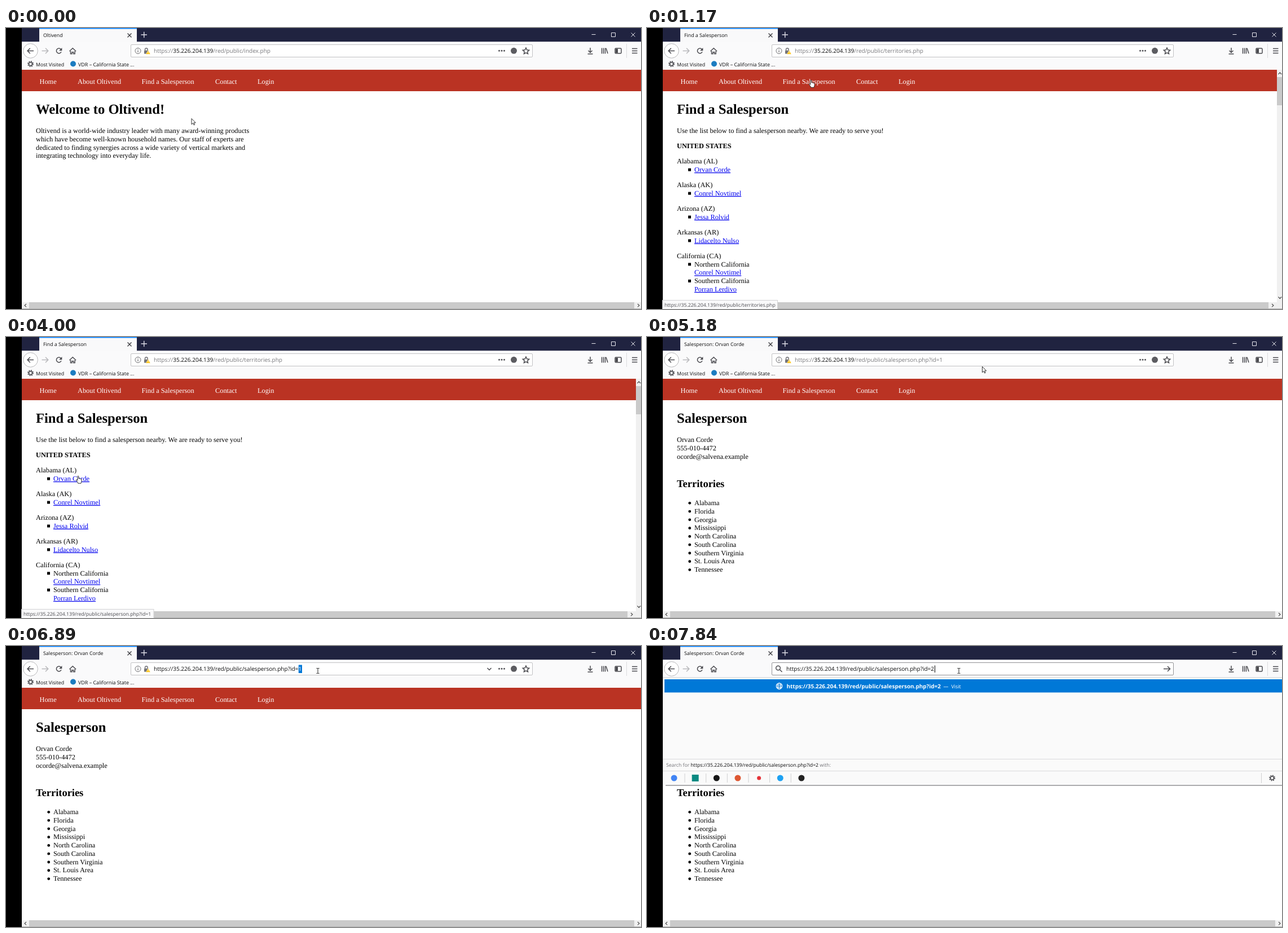
Recreate the animation shown at these times as an HTML page. Size 1126 by 498 pixels, loop 7990 ms.

```html
<!DOCTYPE html>
<html lang="en">
<head>
<meta charset="utf-8">
<title>Browser session</title>
<style>
  html, body { margin: 0; width: 100%; height: 100%; overflow: hidden; background: #fff; }
  svg { display: block; width: 100vw; height: 100vh; }
  text { text-rendering: geometricPrecision; white-space: pre; }
  .ui { font-family: "Open Sans", "Noto Sans", sans-serif; }
  .web { font-family: "Liberation Serif", "Times New Roman", serif; font-size: 12.33px; }
  .icon { fill: none; stroke: #4a4a4f; stroke-width: 1.5; }
</style>
</head>
<body>
<svg id="stage" viewBox="0 0 1126 498" xmlns="http://www.w3.org/2000/svg"></svg>
<script>
const LOOP = 7990, STEP = 120, LINE = 14.78;
const INK = '#0c0c0d', BLUE = '#0078d7';
const HOST = '35.226.204.139', DIR = '/red/public/';
const SELLER = 'Orvan Corde';

const rect = (x, y, w, h, fill, more = '') =>
  `<rect x="${x}" y="${y}" width="${w}" height="${h}" fill="${fill}" ${more}/>`;
const line = (d, color, width = 1) =>
  `<path d="${d}" fill="none" stroke="${color}" stroke-width="${width}"/>`;
const icon = (d, more = '') => `<path class="icon" d="${d}" ${more}/>`;
const dot = (x, y, r, fill) => `<circle cx="${x}" cy="${y}" r="${r}" fill="${fill}"/>`;
const ui = (x, y, s, size, fill = INK) =>
  `<text class="ui" x="${x}" y="${y}" font-size="${size}" fill="${fill}">${s}</text>`;
const web = (x, y, s, more = '') => `<text class="web" x="${x}" y="${y}" ${more}>${s}</text>`;
const head = (y, s, size) => web(53, y, s, `font-weight="700" style="font-size:${size}px"`);
const span = (s, fill, more = '') => `<tspan fill="${fill}" ${more}>${s}</tspan>`;

const gear = (x, y) => `<g class="icon" transform="translate(${x} ${y})">
  <circle r="3"/><circle r="4.5" stroke-width="2" stroke-dasharray="1.767"/></g>`;
const globe = (x, y, color) => `<g fill="none" stroke="${color}" stroke-width="1.1" transform="translate(${x} ${y})">
  <circle r="5.3"/><ellipse rx="2.4" ry="5.3"/><path d="M-5-1.7H5M-5 1.9H5"/></g>`;

// ---- pages -------------------------------------------------------------

const PAGES = {
  home: { title: 'Oltivend', file: 'index.php' },
  list: { title: 'Find a Salesperson', file: 'territories.php', tall: true },
  person: { title: 'Salesperson: ' + SELLER, file: 'salesperson.php?id=1' }
};

const NAV = [[59.5, 'Home'], [127, 'About Oltivend'], [240.5, 'Find a Salesperson'],
  [371, 'Contact'], [446, 'Login']];

const STATES = [
  ['Alabama (AL)', [[SELLER]]],
  ['Alaska (AK)', [['Conrel Novtimel']]],
  ['Arizona (AZ)', [['Jessa Rolvid']]],
  ['Arkansas (AR)', [['Lidacelto Nulso']]],
  ['California (CA)', [['Conrel Novtimel', 'Northern California'], ['Porran Lerdivo', 'Southern California']]]
];

const lines = (y, list, x = 53) => list.map((s, i) => web(x, y + i * LINE, s)).join('');

function homeBody() {
  return head(151.7, 'Welcome to Oltivend!', 24.6) + lines(186, [
    'Oltivend is a world-wide industry leader with many award-winning products',
    'which have become well-known household names. Our staff of experts are',
    'dedicated to finding synergies across a wide variety of vertical markets and',
    'integrating technology into everyday life.']);
}

function listBody() {
  let out = head(151.7, 'Find a Salesperson', 24.6) +
    web(53, 186, 'Use the list below to find a salesperson nearby. We are ready to serve you!') +
    web(53, 213, 'UNITED STATES', 'font-weight="700"');
  STATES.forEach(([state, people], i) => {
    let y = 240.2 + i * 41.9;
    out += web(53, y, state);
    for (const [name, region] of people) {
      y += LINE;
      out += rect(73, y - 6.3, 5, 5, '#000');
      if (region) { out += web(84, y, region); y += LINE; }
      out += web(84, y, name, 'fill="#0000ee" text-decoration="underline"');
    }
  });
  return out;
}

function personBody() {
  const places = ['Alabama', 'Florida', 'Georgia', 'Mississippi', 'North Carolina',
    'South Carolina', 'Southern Virginia', 'St. Louis Area', 'Tennessee'];
  return head(151.7, 'Salesperson', 24.6) +
    lines(186, [SELLER, '555-010-4472', 'ocorde@salvena.example']) +
    head(265.5, 'Territories', 18.45) + lines(298, places, 84) +
    places.map((_, i) => dot(75.7, 294.3 + i * LINE, 2.4, '#000')).join('');
}

const BODY = { home: homeBody(), list: listBody(), person: personBody() };

function pageView(name) {
  const tall = PAGES[name].tall, right = tall ? 1117 : 1126, end = tall ? 1102 : 1114;
  let out = rect(28, 74, 1098, 424, '#fff') + rect(28, 74, right - 28, 38, '#ba3323') +
    NAV.map(([x, s]) => web(x, 99, s, 'fill="#fff"')).join('') + BODY[name] +
    rect(28, 486, 1098, 12, '#f0f0f0') + rect(41, 486, end - 41, 11, '#cacaca') +
    line(`M36 489l-3 2.7l3 2.7M${end + 6} 489l3 2.7l-3 2.7`, '#505050', 1.2) +
    rect(28, 497, 1098, 1, '#b4b4b4');
  if (tall) out += rect(1117, 74, 9, 412, '#f0f0f0') + rect(1117, 87, 9, 50, '#cacaca') +
    line('M1119.5 82l2.8-3l2.8 3M1119.5 476.500l2.8 3l2.8-3', '#505050', 1.2);
  return out;
}

// ---- browser chrome ----------------------------------------------------

const CHROME = rect(0, 0, 28, 498, '#000') + rect(28, 0, 1098, 24.5, '#202340') +
  rect(59, 0, 173, 25, '#f9f9fa') + rect(59, 0, 173, 1.6, '#0a84ff') +
  rect(28, 24.5, 1098, 49.5, '#fafafb') +
  line('M215.5 9.500l7 7m0-7l-7 7', '#38383d', 1.3) +
  line('M239.500 12h10.500M244.750 6.800v10.500', '#dcdce4', 1.4) +
  line('M1038.500 11.500h7M1073.500 8.500h7v7h-7zM1108.500 8.500l7 7m0-7l-7 7', '#e8e8ee') +
  '<circle cx="43.500" cy="40.500" r="12.800" fill="#fff" stroke="#b8b8ba"/>' +
  icon('M49 40.500H38.500M42.800 35.800l-4.700 4.700l4.700 4.700', 'stroke-width="1.800"') +
  line('M63.500 40.500H74M70 35.800l4.700 4.700l-4.700 4.700', '#b9b9bc', 1.6) +
  icon('M112.500 41.200l5.800-5.400l5.800 5.400M114.500 41v4.700h2.500v-3h2.600v3h2.500V41') +
  icon('M1036 35v8M1032.500 40l3.500 3.500l3.500-3.500M1031.500 46h9') +
  icon('M1056.500 35.500v10M1059.500 35.500v10M1062.500 35.500v10M1064 35.800l3 9.500') +
  '<rect class="icon" x="1080" y="36" width="11" height="9" rx="1.500"/>' +
  rect(1081, 37, 4, 7, '#4a4a4f') + rect(1100, 28, 1, 25, '#dcdcde') +
  icon('M1110 36.500h9.500M1110 40.500h9.500M1110 44.500h9.500') +
  gear(43.5, 63.7) + ui(53, 67.6, 'Most Visited', 8.8) +
  dot(119, 63.5, 5, '#1c7cc0') + ui(128, 67.6, 'VDR – California State ...', 8.95);

const RELOAD = icon('M98 42.300A4.500 4.500 0 1 1 97.300 37.500', 'stroke-width="1.700"') +
  '<path d="M99.300 35v5.200h-5.200z" fill="#4a4a4f"/>';
const STOP = icon('M90 36.500l8 8m0-8l-8 8', 'stroke-width="1.700"');

const PAGE_ICONS =
  '<circle cx="234" cy="40.500" r="5" fill="none" stroke="#6a6a6e"/>' +
  line('M234 39.800v3.500M234 37.500v1.300', '#6a6a6e', 1.2) +
  rect(245, 39.8, 8, 6, '#737378', 'rx="1"') + line('M246.500 40v-2a2.300 2.300 0 0 1 4.600 0v2', '#737378', 1.5) +
  '<path d="M252 39.500l4 7h-8z" fill="#ffbf00" stroke="#fff" stroke-width=".5"/>' +
  line('M252 41.800v2.200M252 44.800v.900', '#fff') +
  [874.5, 879, 883.5].map(x => dot(x, 40.3, 1.5, '#55555a')).join('') +
  dot(900.5, 40.3, 5.5, '#5c5c61') +
  icon('M922 35l1.700 3.700l4 .500l-3 2.700l.800 4l-3.500-2l-3.500 2l.800-4l-3-2.700l4-.500z', 'stroke-width="1.200"');
const TYPING_ICONS = '<g class="icon"><circle cx="232.500" cy="39" r="3.800"/>' +
  '<path d="M235.500 42l4 4M916 40.500h11.500M923 36l4.500 4.500l-4.500 4.500"/></g>';

function urlBar(s) {
  const path = DIR + PAGES[s.page].file, size = 10.04;
  const box = rect(221.5, 29.5, 712, 22, '#fff', `rx="1.5" stroke="${s.typed == null ? '#c2c2c4' : '#939396'}"`);
  if (s.typed != null) {
    const url = `https://${HOST}${DIR}salesperson.php?id=${s.typed}`;
    return box + TYPING_ICONS + ui(247, 44.3, url, size) +
      rect(s.typed ? 510 : 504.2, 34.5, 1, 12.5, '#000');
  }
  let out = box + PAGE_ICONS;
  if (s.beam) out += icon('M853.500 39l3.500 3.500l3.500-3.500', 'stroke-width="1.300"');
  if (s.picked === 'all')
    return out + rect(262, 33.5, 263, 14.5, BLUE) + ui(262, 44.3, `https://${HOST}${path}`, size, '#fff');
  if (s.picked === 'last')
    return out + rect(518.8, 33.5, 6.2, 14.5, BLUE) +
      ui(262, 44.3, `https://${HOST}${path.slice(0, -1)}` + span('1', '#fff'), size);
  return out + ui(262, 44.3, 'https://' + span(HOST, INK) + path, size, '#77777b');
}

function status(file) {
  const w = file.length > 16 ? 234.5 : 204;
  return rect(27.5, 482.5, w, 16, '#f9f9fa', 'stroke="#d2d2d4"') +
    ui(31, 494.3, `https://${HOST}${DIR}${file}`, 8.66, '#4a4a4f');
}

// ---- address suggestions -----------------------------------------------

const HINTS = [
  ['Salesperson: ' + SELLER],
  ['Salesperson: Fakey McFakelston (NOT PUBLIC UNTIL SEPT. 1)', 'salesperson.php?id=10'],
  ['Salesperson: Slow Slowman (FIRED FOR STEALING)', 'salesperson.php?id=11'],
  ['Salesperson: Conrel Novtimel', 'salesperson.php?id=4'],
  ['Find a Salesperson', 'territories.php']
];
const ENGINES = ['#4285f4', '#0b8a82', '#161616', '#de5833', '#e53238', '#1da1f2', '#222'];

const after = (s, dash, fill) =>
  span('—', dash, 'dx="4.5" font-size="9"') + span(s, fill, 'dx="5" font-size="8.950"');

function suggestions({ typed, open, query, hints }) {
  const url = id => `https://${HOST}${DIR}salesperson.php?id=${id}`;
  const fold = open ? 200 : 169.5, base = open ? 222 : 193.5, end = open ? 247 : 216;
  let out = rect(28, 56, 1098, (open ? end : base) - 56, '#fafafa') +
    rect(28, 55.5, 1098, 1, '#d0d0d2') + rect(31, 59, 1095, 23.4, BLUE) + globe(234.5, 71, '#fff') +
    ui(247.5, 75.3, span(url(typed), '#fff', 'font-weight="700" font-size="9.930"') + after('Visit', '#fff', '#fff'), 9.93);
  if (hints) {
    out += `<clipPath id="fold"><path d="M28 56H1126V${open ? fold : 166}H28z"/></clipPath><g clip-path="url(#fold)">`;
    HINTS.forEach(([title, file], i) => {
      const y = 94.3 + i * 23.25;
      out += globe(234.5, y - .3, '#55555a') + ui(247.5, y + 3.7, title +
        (file ? after(`https://${HOST}${DIR}${file}`, '#77777b', '#0a6cd0')
              : after('Switch to Tab', '#77777b', '#058b85')), 10.03);
    });
    out += rect(213, 90, 8.5, 6, '#55555a', 'rx="1"') + rect(211, 96.3, 12.5, 1.7, '#55555a') + '</g>';
  }
  out += rect(28, fold, 1098, 1, '#dadadc') + rect(28, base - 1, 1098, 1, '#dadadc') +
    ui(34, fold + 14.3, 'Search for ' + span(url(query), INK) + ' with:', 8.68, '#737378');
  if (open) {
    ENGINES.forEach((c, i) => {
      const x = 48 + i * 37.65;
      out += i === 1 ? rect(x - 6, 228, 12, 12, c) : dot(x, 234, i === 4 ? 3.5 : 5.5, c);
      if (i < 6) out += rect(x + 18.5, 226, 1, 16, '#cfcfd1');
    });
    out += rect(1089, 225, 1, 18, '#cfcfd1') + gear(1108.5, 234);
  }
  return out + rect(33, end - .7, 1093, 1.5, '#929294');
}

// ---- pointer -----------------------------------------------------------

const SHAPES = {
  arrow: '<path d="M.500 .500V10.800L3 8.500L4.700 12L6.200 11.300L4.600 7.900H7.800Z" fill="#fff" stroke="#1c1c1c" stroke-width=".900"/>',
  hand: '<path d="M-1.100 8.300V1.200C-1.100 0 .900 0 .900 1.200V5C1.300 4.200 2.600 4.400 2.700 5.400C3.200 4.700 4.400 4.900 4.500 5.900C5.200 5.400 6.100 5.800 6.100 6.700V9.500C6.100 11 5.200 11.700 5 13.300H-.300C-.800 11.200-2.500 9.800-3.500 7.900C-3.800 6.600-2.400 6.300-1.100 8.300Z" fill="#fff" stroke="#1c1c1c" stroke-width=".900"/>',
  beam: '<path d="M-2.500-4.500h2l.500.500l.500-.500h2M0-4V4M-2.500 4.500h2l.500-.500l.500.500h2" fill="none" stroke="#222"/>'
};

// start time, number of steps, target x, target y, shape
const MOVES = [
  [0, 1, 328.5, 160, 'arrow'], [120, 1, 365, 130, 'arrow'], [240, 1, 330, 104, 'arrow'],
  [360, 1, 291, 95, 'hand'], [510, 1, 291, 92, 'hand'], [1570, 1, 275, 114, 'arrow'],
  [1720, 3, 266, 142, 'arrow'], [2110, 6, 183, 195, 'arrow'], [2860, 4, 147, 225, 'arrow'],
  [3370, 4, 129, 242, 'arrow'], [3880, 2, 128, 246, 'hand'], [4150, 1, 128, 249, 'hand'],
  [4550, 1, 128, 247, 'arrow'], [5060, 2, 594, 52, 'arrow'], [5330, 1, 572, 46, 'beam'],
  [5450, 2, 553, 44, 'beam']
];

function pointer(t) {
  const i = MOVES.findLastIndex(m => t >= m[0]);
  const [t0, n, x, y, shape] = MOVES[i], from = MOVES[Math.max(0, i - 1)];
  const k = Math.min(1, (Math.floor((t - t0) / STEP) + 1) / n);
  const at = (a, b) => (a + (b - a) * k).toFixed(1);
  return `<g transform="translate(${at(from[2], x)} ${at(from[3], y)})">${SHAPES[shape]}</g>`;
}

// ---- timeline ----------------------------------------------------------

const within = (t, a, b) => t >= a && t < b;

function scene(t) {
  const s = {
    page: t < 900 ? 'home' : t < 4550 ? 'list' : 'person',
    loading: within(t, 780, 900) || within(t, 4400, 4550),
    beam: t >= 5330,
    picked: within(t, 5690, 6300) ? 'all' : t >= 6300 ? 'last' : '',
    typed: t < 7290 ? null : t < 7530 ? '' : '2',
    open: t >= 7410,
    hints: t < 7840,
    query: t < 7840 ? '' : '2'
  };
  let out = pageView(s.page) + CHROME + (s.loading ? STOP : RELOAD) +
    ui(66, 16, s.loading ? 'Connecting…' : PAGES[s.page].title, 8.8) + urlBar(s);
  if (within(t, 510, 1960)) out += status(PAGES.list.file);
  if (within(t, 3880, 4550)) out += status(PAGES.person.file);
  if (s.typed != null) out += suggestions(s);
  return out + pointer(t);
}

const stage = document.getElementById('stage');
const began = performance.now();
let shown = '';

function draw() {
  const next = scene((performance.now() - began) % LOOP);
  if (next !== shown) stage.innerHTML = shown = next;
  requestAnimationFrame(draw);
}
draw();
</script>
</body>
</html>
```
